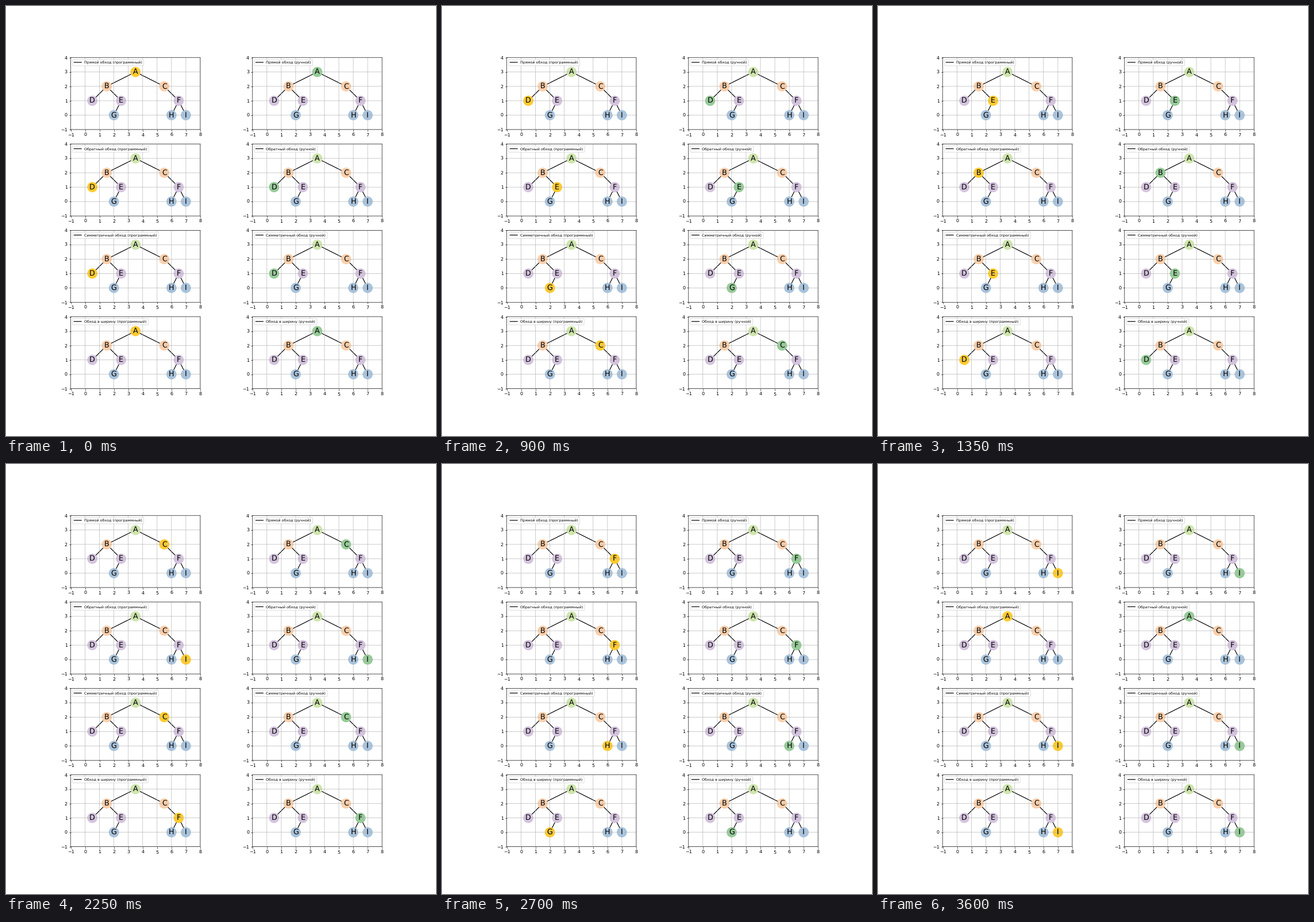
These frames come from a looping animation (748 px wide and 748 px high, 4.05 s). A matplotlib script:

```python
import matplotlib.pyplot as plt
from matplotlib.animation import FuncAnimation
from matplotlib.patches import Circle

# Smooth, unsnapped rendering of thin lines and small text.
plt.rcParams.update({
    "font.family": "DejaVu Sans",
    "text.hinting": "no_hinting",
    "path.snap": False,
})

POS = {
    "A": (3.5, 3), "B": (1.5, 2), "C": (5.5, 2),
    "D": (0.5, 1), "E": (2.5, 1), "F": (6.5, 1),
    "G": (2, 0), "H": (6, 0), "I": (7, 0),
}
KIDS = {"A": "BC", "B": "DE", "C": " F", "E": "G ", "F": "HI"}
LEVEL_COLORS = {3: "#cfe5ae", 2: "#fccfab", 1: "#d4c3de", 0: "#a9c4de"}
MODES = [("программный", "#ffcb30"), ("ручной", "#96cb98")]
RADIUS = 0.355


def children(node):
    return KIDS.get(node, "  ")


def preorder(node):
    if node == " ":
        return ""
    left, right = children(node)
    return node + preorder(left) + preorder(right)


def postorder(node):
    if node == " ":
        return ""
    left, right = children(node)
    return postorder(left) + postorder(right) + node


def inorder(node):
    if node == " ":
        return ""
    left, right = children(node)
    return inorder(left) + node + inorder(right)


def breadth_first(root):
    order, queue = "", [root]
    while queue:
        node = queue.pop(0)
        order += node
        queue += [kid for kid in children(node) if kid != " "]
    return order


WALKS = [
    ("Прямой обход", preorder("A")),
    ("Обратный обход", postorder("A")),
    ("Симметричный обход", inorder("A")),
    ("Обход в ширину", breadth_first("A")),
]


def base_color(node):
    return LEVEL_COLORS[POS[node][1]]


def draw_tree(ax, label):
    """Draw the tree on one axes and return its node circles."""
    ax.set_aspect("equal")
    ax.set(xlim=(-1, 8), ylim=(-1, 4), xticks=range(-1, 9), yticks=range(-1, 5))
    ax.grid(True)
    # Edges lie under the nodes, the grid runs over both.
    for node, kids in KIDS.items():
        for kid in kids.strip():
            xs, ys = zip(POS[node], POS[kid])
            ax.plot(xs, ys, color="black", lw=1.5, label=label, zorder=0)
            label = None
    circles = {}
    for node, (x, y) in POS.items():
        circles[node] = ax.add_patch(
            Circle((x, y), RADIUS, fc=base_color(node), ec="none", zorder=1))
        ax.text(x, y, node, fontsize=16, ha="center", va="center")
    ax.legend(loc="upper left", fontsize=8)
    return circles


fig, axes = plt.subplots(4, 2, figsize=(13, 13), dpi=57.54)
panels = []
for row, (title, order) in zip(axes, WALKS):
    for ax, (mode, color) in zip(row, MODES):
        panels.append((draw_tree(ax, f"{title} ({mode})"), order, color))


def update(step):
    changed = []
    for circles, order, color in panels:
        for node, circle in circles.items():
            circle.set_facecolor(color if node == order[step] else base_color(node))
            changed.append(circle)
    return changed


anim = FuncAnimation(fig, update, frames=len(POS), interval=450, repeat=True)
plt.show()
```
